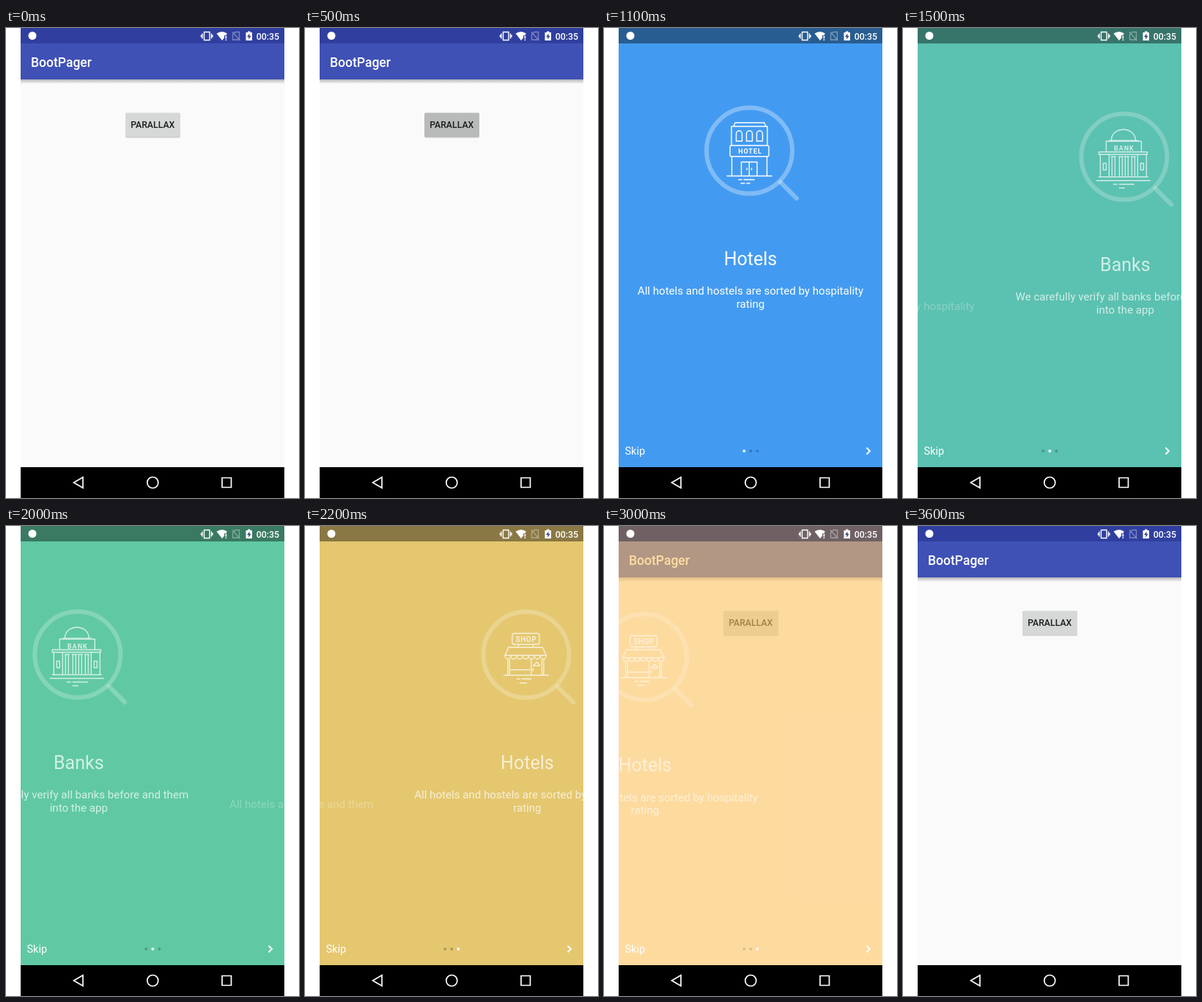
Write an HTML page that moves like this. It is 400 by 640 pixels and loops after 3800 ms.

```html
<!DOCTYPE html>
<html lang="en">
<head>
<meta charset="utf-8">
<title>Pager demo</title>
<style>
  html, body { margin: 0; width: 100%; height: 100%; overflow: hidden; background: #fff; }
  svg { display: block; width: 100vw; height: 100vh; font-family: Roboto, Arial, sans-serif; }
  .mid { text-anchor: middle; }
  .medium { font-weight: 500; }
  .title { font-size: 25px; }
  .body { font-size: 15.1px; }
  .sign { font-size: 9px; font-weight: 700; stroke: none; fill: #fff; letter-spacing: 1px; text-anchor: middle; }
  .line { fill: none; stroke: #fff; stroke-width: 1.4; stroke-linecap: round; stroke-linejoin: round; }
  .lens { fill: none; stroke: #fff; stroke-opacity: .32; stroke-width: 6; stroke-linecap: round; }
</style>
</head>
<body>
<svg viewBox="0 0 400 640">
  <defs>
    <clipPath id="screen"><rect x="20" width="360" height="598"/></clipPath>
    <clipPath id="buttonClip"><rect x="163" y="115.500" width="75" height="33" rx="2"/></clipPath>
    <linearGradient id="shade" x2="0" y2="1">
      <stop stop-opacity=".28"/><stop offset="1" stop-opacity="0"/>
    </linearGradient>
    <g id="lens" class="lens">
      <circle cx="198.500" cy="167" r="58.500"/>
      <path d="M241 210L263 232"/>
    </g>
  </defs>

  <g clip-path="url(#screen)">
    <!-- start screen -->
    <rect x="20" width="360" height="598" fill="#fafafa"/>
    <rect x="20" y="70" width="360" height="6" fill="url(#shade)"/>
    <rect x="20" y="21" width="360" height="49" fill="#3f51b5"/>
    <rect x="20" width="360" height="21" fill="#303f9f"/>
    <text class="medium" x="34" y="52.500" font-size="17.500" fill="#fff">BootPager</text>
    <rect x="163" y="116.500" width="75" height="33" rx="2" opacity=".2"/>
    <rect x="163" y="115.500" width="75" height="33" rx="2" fill="#d6d7d7"/>
    <circle id="ripple" cx="200" cy="132" r="0" opacity=".14" clip-path="url(#buttonClip)"/>
    <text class="mid medium" x="200.300" y="136.300" font-size="12.260" fill="#1c1c1c">PARALLAX</text>

    <!-- pager -->
    <g id="pager" opacity="0" fill="#fff">
      <rect id="back" x="20" width="360" height="598"/>
      <rect x="20" width="360" height="21" fill="#000" opacity=".4"/>

      <g class="page">
        <use href="#lens"/>
        <g class="line">
          <path d="M174 160V134H223V160M177 134L179 129H219L221 134"/>
          <path d="M180.500 154V144a4 4 0 0 1 8 0v10zM194.500 154V144a4 4 0 0 1 8 0v10zM208.500 154V144a4 4 0 0 1 8 0v10z"/>
          <rect x="172" y="160" width="53" height="15" rx="2"/>
          <path d="M174.500 175V201M222.500 175V201M187.500 201V182.500H209V201M198.300 183V201M195 191v2M201.500 191v2"/>
          <path d="M168 201.500H229M184 206.500h4M191 206.500h14M187 211.500h5M195 211.500h4"/>
          <text class="sign" x="199.500" y="171">HOTEL</text>
        </g>
        <text class="mid title" x="200" y="322.500">Hotels</text>
        <text class="mid body" x="200" y="363">All hotels and hostels are sorted by hospitality</text>
        <text class="mid body" x="200" y="380.700">rating</text>
      </g>

      <g class="page">
        <use href="#lens"/>
        <g class="line">
          <path d="M181 145C181 125 214 125 214 145M178 145H217"/>
          <path d="M174 160V146H222V160M164 160.500H230V164H164z"/>
          <path d="M166 164V194M178 164V194M217 164V194M229 164V194"/>
          <path d="M170 176h4v9h-4zM221 176h4v9h-4z"/>
          <path d="M181 167h6M182 167V193M186 167V193M191 167h6M192 167V193M196 167V193M199 167h6M200 167V193M204 167V193M208 167h6M209 167V193M213 167V193"/>
          <path d="M164 194.500H231M161 199.500H234M184 204.500h5M192 204.500h20M192 209.500h7"/>
          <text class="sign" x="198.500" y="158.500">BANK</text>
        </g>
        <text class="mid title" x="200" y="322.500">Banks</text>
        <text class="mid body" x="200" y="363">We carefully verify all banks before and them</text>
        <text class="mid body" x="200" y="380.700">into the app</text>
      </g>

      <g class="page">
        <use href="#lens"/>
        <g class="line">
          <rect x="179.500" y="138" width="37" height="15" rx="3"/>
          <path d="M188 153v4M208 153v4M174.500 157H221L226 168H169.500z"/>
          <path id="awning"/>
          <path d="M173.500 174V195M176 174V195M222.500 174V195M177 187.500H204M205.500 174V195M220 174V195M208 182h9M209 181l4-4 4 4M208 186v3"/>
          <path d="M168 195H229M186 200h4M193 200h12M190 205.500h9"/>
          <text class="sign" x="198.500" y="149.300" style="letter-spacing:.5px;font-size:10px">SHOP</text>
        </g>
        <text class="mid title" x="200" y="322.500">Hotels</text>
        <text class="mid body" x="200" y="363">All hotels and hostels are sorted by hospitality</text>
        <text class="mid body" x="200" y="380.700">rating</text>
      </g>

      <text x="28.500" y="581" font-size="14.500">Skip</text>
      <circle class="dot" cx="191.300" cy="576" r="2"/>
      <circle class="dot" cx="200.300" cy="576" r="2"/>
      <circle class="dot" cx="209.300" cy="576" r="2"/>
      <path d="M358.500 571.500l4.500 4.500-4.500 4.500" fill="none" stroke="#fff" stroke-width="2"/>
    </g>
  </g>

  <!-- status bar -->
  <g fill="#fff">
    <circle cx="36" cy="10.500" r="5.500"/>
    <path d="M270.500 5.500h7.500v11h-7.500zM268 7.500v7M280.500 7.500v7M266.500 9.500v3M282 9.500v3" fill="none" stroke="#fff" stroke-width="1.400"/>
    <path d="M287.500 7.500Q295 2.500 302 7.500L300 10H298V13.500L295 17z"/>
    <path d="M299.500 10.500h1.700v4h-1.700zM299.500 15.500h1.700v1.600h-1.700z"/>
    <path d="M309.500 16V9L313 5.500H318.500V16zM309 5.500L319.500 17" fill="none" stroke="#fff" stroke-opacity=".38" stroke-width="1.300"/>
    <path d="M327.500 6h2.500V4.500h3.500V6H336V17H327.500z"/>
    <path d="M332.500 7.500l-3.500 4.500h2.200v3.500l3.500-4.800h-2.200z" fill="#3a4a82"/>
    <text class="medium" x="341.700" y="15.500" font-size="12.400">00:35</text>
  </g>

  <!-- navigation bar -->
  <rect x="20" y="598" width="360" height="42"/>
  <g fill="none" stroke="#fff" stroke-width="1.700">
    <path d="M92.500 619L105 611.700V626.300zM295 612.500h12.500v13H295z"/>
    <circle cx="200.300" cy="619" r="7.500"/>
  </g>
</svg>

<script>
const LOOP = 3800, STEP = 100, WIDTH = 360, DROP = 28.8;
const COLORS = [[67, 155, 241], [96, 201, 163], [255, 199, 100]];
const $ = id => document.getElementById(id);
const pages = document.querySelectorAll('.page');
const dots = document.querySelectorAll('.dot');

const clamp = v => Math.min(1, Math.max(0, v));
const ramp = (t, from, to) => clamp((t - from) / (to - from));
const easeOut = (u, power) => 1 - Math.pow(1 - u, power);

$('awning').setAttribute('d', 'M169.500 168' + 'a4 5 0 0 0 8.070 0'.repeat(7));

function mixColor(pos) {
  const i = Math.min(1, Math.floor(pos));
  const k = ramp(pos - i, .28, .8);
  return `rgb(${COLORS[i].map((c, n) => Math.round(c + (COLORS[i + 1][n] - c) * k))})`;
}

function draw(t) {
  const leave = easeOut(ramp(t, 2800, 3400), 1.26);
  const pos = easeOut(ramp(t, 1200, 1800), 1.8) + easeOut(ramp(t, 1900, 2500), 1.8) + leave;
  const enter = Math.sin(ramp(t, 500, 1000) * Math.PI / 2);

  $('ripple').setAttribute('r', t < 1000 ? 50 * ramp(t, 200, 500) : 0);
  $('pager').setAttribute('opacity', enter * (1 - leave));
  $('back').setAttribute('fill', mixColor(pos));

  pages.forEach((page, i) => {
    const off = i - pos, away = Math.abs(off);
    page.setAttribute('transform', `translate(${off * WIDTH} ${away * DROP})`);
    page.setAttribute('opacity', clamp(1 - away));
  });

  const active = Math.min(2, Math.round(pos));
  dots.forEach((dot, i) => {
    dot.setAttribute('fill', i === active ? '#fff' : '#000');
    dot.setAttribute('opacity', i === active ? .85 : .22);
  });
}

const start = performance.now();
function tick() {
  const t = (performance.now() - start) % LOOP;
  draw(Math.floor(t / STEP) * STEP);
  requestAnimationFrame(tick);
}
tick();
</script>
</body>
</html>
```
